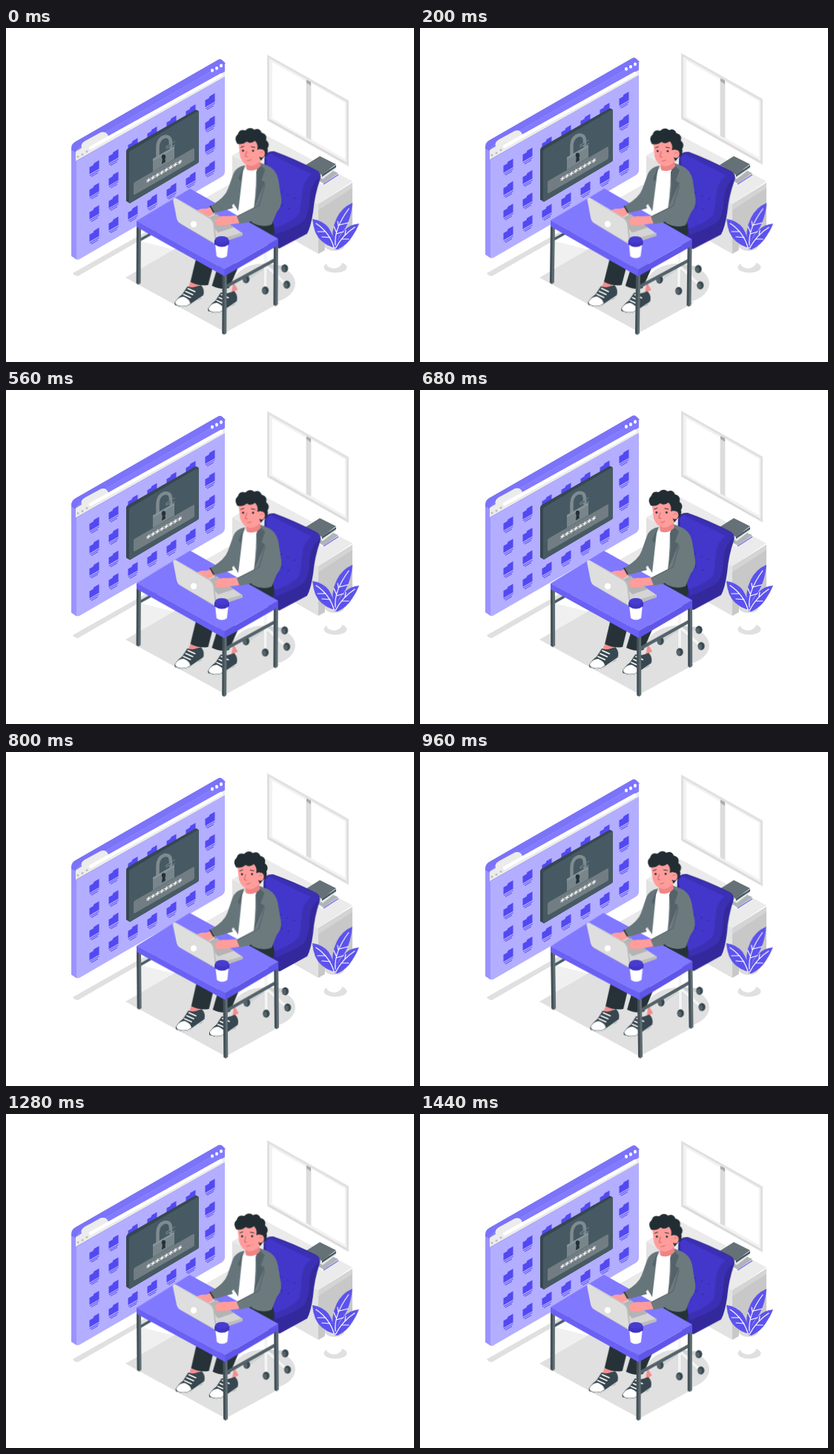
An HTML page without scripts for the animation above (1480 ms loop, 550 px wide and 451 px high).

```html
<!DOCTYPE html>
<html lang="en">
<head>
<meta charset="utf-8">
<title>Working at a desk</title>
<style>
html, body { margin: 0; width: 100%; height: 100%; overflow: hidden; background: #fff; }
svg { display: block; width: 100vw; height: 100vh; }
.float, .sway, .leaves { animation: 740ms cubic-bezier(.37, 0, .63, 1) infinite alternate; }
.float { animation-name: float; animation-delay: -60ms; }
.sway { animation-name: sway; animation-delay: -455ms; transform-origin: 270px 265px; }
.leaves { animation-name: leaves; animation-delay: -455ms; transform-origin: 443px 296px; }
@keyframes float { to { transform: translateY(-8px); } }
@keyframes sway { from { transform: rotate(-.85deg); } to { transform: rotate(.85deg); } }
@keyframes leaves { from { transform: rotate(-.4deg); } to { transform: rotate(.4deg); } }
.stars { font: bold 12px "DejaVu Sans Mono", monospace; letter-spacing: -1.2px; fill: #fff; }
.line { fill: none; stroke-linecap: round; stroke-linejoin: round; }
</style>
</head>
<body>
<svg viewBox="0 0 550 451" preserveAspectRatio="none">
<defs>
  <g id="folder" transform="skewY(-30)">
    <path d="M-6.500-4.500h5l1-2h7V5h-13z" fill="#5349f2"/>
    <path d="M-6 7H6.500M-4 9.500H5" stroke="#6056f2" stroke-width="1.2"/>
  </g>
  <g id="column">
    <use href="#folder"/><use href="#folder" y="30.3"/><use href="#folder" y="60.6"/><use href="#folder" y="91"/>
  </g>
  <g id="shoe">
    <path d="M228 371Q231 365 238 360L245 349Q252 352 263 347Q268 352 267 359Q266 365 258 368L248 375Q240 379 232 376Q227 375 228 371z" fill="#37474f"/>
    <path d="M229 370Q233 363 240 363Q248 366 249 372Q243 377 234 375Q228 374 229 370z" fill="#fff"/>
    <path class="line" d="M240 360l9 4M243 356l9 4M246 352l9 4" stroke="#fff" stroke-width="1.9"/>
    <path class="line" d="M230 375Q242 379 250 373L266 362" stroke="#e9ebec" stroke-width="1.3"/>
  </g>
  <g id="wheel">
    <ellipse rx="4.6" ry="5.4" fill="#37474f"/>
    <ellipse cx="-1.5" cy="1" rx="2.6" ry="3.8" fill="#566469"/>
  </g>
</defs>

<!-- floor -->
<path d="M182 288L238 302L182 330z" fill="#f0f0f0"/>
<g fill="#e0e0e0">
  <path d="M90 331L300 212L305 215L97 335Q92 335 90 331z"/>
  <path d="M262 234L300 212L315 222L275 242z" fill="#e9e9e9"/>
  <path d="M161 337L235 294L369 371L296 411z"/>
  <ellipse cx="348" cy="345" rx="42" ry="27"/>
</g>

<!-- window -->
<g class="float">
  <path d="M352 36L462 98V187L352 125z" fill="#e0e0e0"/>
  <path d="M355 41L459 100V182L355 123z" fill="#f2f2f2"/>
  <path d="M359 46L404 72V148L359 122zM412 75L457 101V177L412 151z" fill="#fff"/>
  <path d="M405 70L411 73V151L405 148z" fill="#dcdcdc"/>
  <path d="M405 70L411 73V78L405 74z" fill="#aaa"/>
  <path d="M355 124L459 183" stroke="#d9d9d9" stroke-width="2"/>
</g>

<!-- browser -->
<g class="float">
  <path d="M88 163Q88 157 93 154L286 43Q289 41 292 44L296 48L97 166V313L88 308z" fill="#7b73f8"/>
  <path d="M88 165L95 169V313L88 308z" fill="#9a93ff"/>
  <path d="M95 168Q95 164 99 161L295 48V194Q295 198 291 201L98 313H95z" fill="#b3aeff"/>
  <path d="M95 168Q95 164 99 161L295 48V66L95 180z" fill="#837bff"/>
  <path d="M94 167L102 162Q100 157 106 153L128 141Q135 139 138 146L295 59V66L94 180z" fill="#ececec"/>
  <path class="line" d="M114 162L290 63.500" stroke="#fff" stroke-width="4.500"/>
  <g fill="#fff">
    <ellipse cx="278" cy="57.500" rx="2" ry="2.4"/><ellipse cx="284" cy="54.500" rx="2" ry="2.4"/><ellipse cx="290" cy="51" rx="2" ry="2.4"/>
  </g>
  <path class="line" d="M97 174v0M103 171v0M109 167v0" stroke="#bdbdbd" stroke-width="3"/>
  <use href="#column" x="119" y="189"/><use href="#column" x="145" y="174"/>
  <use href="#column" x="171" y="159"/><use href="#column" x="197" y="143.5"/>
  <use href="#column" x="223" y="128.5"/><use href="#column" x="249" y="113.5"/>
  <use href="#column" x="275" y="98.5"/>

  <path d="M162 167Q162 165 164 163L255 111Q257 110 260 113V180Q260 182 258 183L167 237L162 234z" fill="#37474f"/>
  <path d="M166 169Q166 167 168 166L258 113Q260 112 260 114V180Q260 182 258 183L168 236Q166 237 166 235z" fill="#475a63"/>
  <path d="M172 211Q172 209 174 208L252 163Q254 162 254 164V177Q254 179 252 180L174 225Q172 226 172 224z" fill="#717d82"/>
  <text class="stars" transform="translate(188.500 213.800) skewY(-30)">********</text>
  <path class="line" d="M204.500 176V161Q205 150 213 147Q222 145 222 155V161" stroke="#7e8b90" stroke-width="4.5"/>
  <path d="M198 177L227 160V177L198 194z" fill="#78868c"/>
  <path d="M198 177L227 160V163L198 180z" fill="#87949a"/>
  <path d="M216 160l6-3v3l-6 3zM223 156l5-3M224 160l4-2" fill="#53646c" stroke="#76848a"/>
  <ellipse cx="212.500" cy="174" rx="2.700" ry="3.200" fill="#263238"/>
  <path d="M211 175l3-1 1 7-5 3z" fill="#263238"/>
</g>

<!-- cabinet and books -->
<path d="M305 172L351 145L467 207L421 238z" fill="#ebebeb"/>
<path d="M305 172L421 238V305L305 239z" fill="#e2e2e2"/>
<path d="M421 238L467 209V279L421 305z" fill="#c8c8c8"/>
<path d="M421 238L467 209V216L421 246z" fill="#d4d4d4"/>
<path d="M407 197L426 186L448 196L428 210z" fill="#aeb4b7"/>
<path d="M407 198L428 210L448 197V200L428 213L407 201z" fill="#f4f4f4"/>
<path d="M428 211L448 198" stroke="#8a83e6" stroke-width="1.500"/>
<path d="M404 186L426 199L445 186V190L427 204L404 191z" fill="#e7e7e7"/>
<path d="M404 185L423 173L445 184L426 198z" fill="#657176"/>
<path d="M426 198L445 185V188L426 201z" fill="#455a64"/>

<!-- plant -->
<ellipse cx="444" cy="323" rx="15.500" ry="7.500" fill="#e0e0e0"/>
<path d="M430 293Q429 308 433 321Q443 329 452 320Q457 306 456 293z" fill="#fff"/>
<ellipse cx="443" cy="294" rx="13" ry="7" fill="#dcdcdc"/>
<g class="leaves">
  <g fill="#5c52ed">
    <path d="M442 294Q437 274 446 256Q453 242 467 236Q466 248 463 257Q459 270 452 277Q446 285 446 294z"/>
    <path d="M440 296Q423 290 417 276Q414 268 413 258Q427 260 435 270Q442 281 444 296z"/>
    <path d="M443 299Q446 284 456 273Q464 265 476 264Q472 274 467 281Q460 293 447 299z"/>
  </g>
  <path class="line" d="M444 293Q442 271 462 244M442 296Q436 276 418 264M444 298Q453 280 470 269M445 275l-3-7M448 267l-1-6M445 278l10-3M449 266l12-3M437 283l-11-1M431 275l-11 0M452 285l10 0M457 279l1-6" stroke="#fff" stroke-width="1.200"/>
</g>

<g class="sway">
  <!-- chair -->
  <path class="line" d="M350 321L326 338M350 321L376 323M350 321L350 351M350 321L376 344" stroke="#cfd3d5" stroke-width="5"/>
  <path class="line" d="M350 286V321M350 321L350 348M350 320L374 342" stroke="#f4f4f4" stroke-width="4"/>
  <use href="#wheel" x="324" y="339"/><use href="#wheel" x="376" y="324"/>
  <use href="#wheel" x="350" y="354"/><use href="#wheel" x="379" y="346"/>
  <path d="M348 175Q350 165 361 166Q389 176 418 191Q426 195 423 204Q416 224 414 247Q411 268 406 277L369 297Q355 297 345 285z" fill="#33299c"/>
  <path d="M350 175Q353 166 363 169L413 195Q400 212 401 235Q401 253 397 260L361 272z" fill="#4236cb"/>
  <path d="M359 167Q390 178 418 192Q424 195 421 202Q409 211 409 235Q408 249 402 259Q391 268 364 278L361 270Q388 261 396 249Q398 232 400 215Q404 202 412 197L357 170z" fill="#3b30b3"/>
  <path class="line" d="M371 221v0M380 225v0M389 229v0M372 239v0M381 243v0" stroke="#342a9e" stroke-width="2"/>

  <!-- legs -->
  <path d="M249 343L245 353L258 353L262 343zM307 343L304 358L313 353z" fill="#f28f8f"/>
  <use href="#shoe"/><use href="#shoe" x="45" y="8"/>
  <path d="M257 309L249 343Q261 349 273 347L280 319z" fill="#263238"/>
  <path d="M286 321L278 348Q290 354 301 351L316 317z" fill="#263238"/>
  <path d="M304 260L357 258Q366 270 358 282L315 287z" fill="#263238"/>

  <!-- torso -->
  <path d="M316 192L335 184L350 186L350 252L310 250z" fill="#fff"/>
  <path d="M322 185Q310 187 306 197L299 217Q295 229 276 240L281 249Q300 245 307 237L313 247L319 194z" fill="#65757a"/>
  <path d="M341 181L349 184Q364 189 367 205L371 230Q372 240 365 248L358 265Q345 270 331 262Q337 230 337 195z" fill="#6c7a7e"/>
  <path d="M341 183L349 191L344 205L349 208L335 240Q340 210 337 194zM320 187L313 203L316 207L311 232L316 207z" fill="#536369"/>
  <path d="M322 176L341 171L343 186Q335 195 324 191z" fill="#ee8585"/>

  <!-- head -->
  <path d="M313 156Q316 149 329 150L349 153L344 174Q342 184 329 186Q318 184 315 173z" fill="#ff9d9b"/>
  <path d="M311 156Q306 148 312 143Q314 136 322 138Q328 132 334 137Q341 134 344 141Q352 143 350 151Q356 156 352 162Q354 170 347 174L343 179L341 174L343 163L338 164Q340 157 335 152Q329 157 324 153Q318 158 311 156z" fill="#222d33"/>
  <ellipse cx="344" cy="169" rx="4.500" ry="5.500" fill="#ff9d9b"/>
  <path d="M342 169Q344 165 346 168" fill="none" stroke="#df7777"/>
  <circle cx="319" cy="165.500" r="1.400" fill="#263238"/><circle cx="332.500" cy="165.500" r="1.400" fill="#263238"/>
  <path class="line" d="M316 161l4-1.500M330 160l5 1" stroke="#263238"/>
  <path class="line" d="M324 166l-2 7 3 .5M325 179q3 0 5-1.500" stroke="#b9535a" stroke-width=".8"/>

  <!-- desk -->
  <path d="M182 284L203 272V276L182 288z" fill="#455a64"/>
  <path d="M298 346L361 311V316L298 351z" fill="#536369"/>
  <path d="M176 264H182V345L179 347L176 345zM361 288H367V373L364 375L361 373zM292 329H298V412L295 414L292 412z" fill="#5e6d72"/>
  <path d="M179 268V347L176 345V264zM364 290V375L361 373V290zM295 331V414L292 412V329z" fill="#445159"/>
  <path d="M176 261L295 326L367 284V293L295 335L176 269z" fill="#5f55e8"/>
  <path d="M176 261L295 326V335L176 269z" fill="#6a60f4"/>
  <path d="M176 261L248 217L367 284L295 326z" fill="#8078ff"/>

  <!-- laptop and arms -->
  <path d="M237 257L275 247L319 277L284 288z" fill="#d5d5d5"/>
  <path d="M231 262L281 287L319 276V280L284 292L280 291z" fill="#bcbcbc"/>
  <path d="M270 258L284 251L307 269L286 276z" fill="#b4b4b4"/>
  <path d="M258 246Q264 243 270 244L279 241L284 249L271 256Q264 253 258 249z" fill="#ff9d9b"/>
  <path d="M299 226L276 240L280 250L306 243z" fill="#65757a"/>
  <path d="M275 240l5 9" stroke="#344249" stroke-width="2"/>
  <path d="M281 259Q288 253 297 254L313 253L315 263Q302 265 295 266L284 266z" fill="#ff9d9b"/>
  <path d="M350 207Q367 209 371 231Q370 240 362 246Q340 261 315 264L311 254L341 239z" fill="#6c7a7e"/>
  <path d="M349 211L341 239L312 254" fill="none" stroke="#57676d" stroke-width="1.400"/>
  <path d="M225 232Q226 229 229 230L275 256Q279 259 280 263L283 289Q282 291 279 289L235 264Q231 262 230 257z" fill="#dedede"/>
  <path d="M227 230L277 257Q280 260 281 265L284 289L282 290L279 264Q278 260 274 257z" fill="#bdbdbd"/>
  <circle cx="253" cy="265" r="4.200" fill="#fff"/>

  <!-- cup -->
  <path d="M282 290H300L298 308Q291 313 284 308z" fill="#fff"/>
  <path d="M281 287L283 284H299L301 287V292Q291 299 281 292z" fill="#4035c2"/>
  <ellipse cx="291" cy="285.500" rx="9" ry="4.500" fill="#473cd0"/>
</g>
</svg>
</body>
</html>
```
